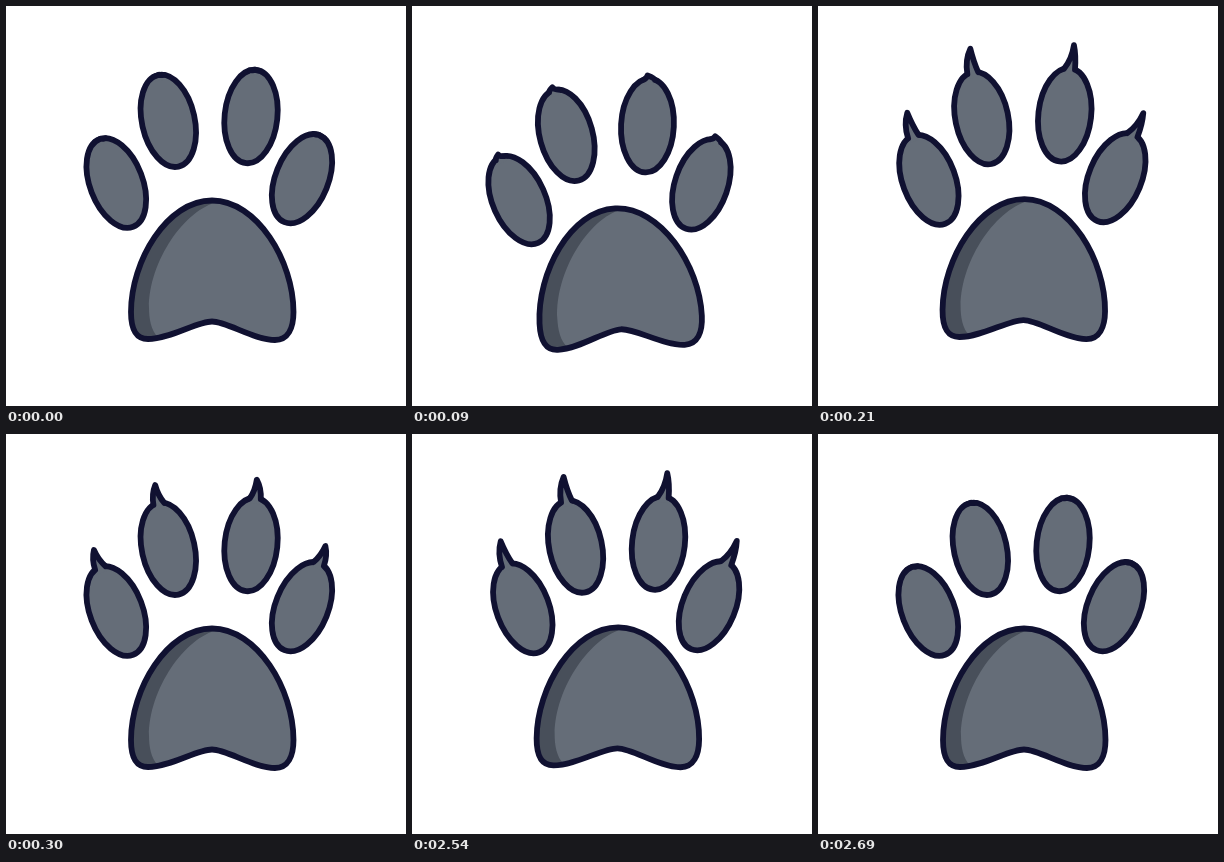
An HTML page for the animation above (3.72 s loop, 400 by 400 pixels).

```html
<!DOCTYPE html>
<html lang="en">
<head>
<meta charset="utf-8">
<title>Paw</title>
<style>
html, body { margin: 0; width: 100%; height: 100%; overflow: hidden; background: #fff; }
svg { display: block; width: 100%; height: 100%; }
.body { fill: #656d78; }
.shade { fill: #484f5a; }
.line { fill: none; stroke: #101131; stroke-width: 5.8; stroke-linecap: round; stroke-linejoin: round; }
</style>
</head>
<body>
<svg viewBox="0 0 400 400">
  <g id="pad">
    <path id="shape" class="body" d="M206 194.5C161 194.5 125 255 125 306C125 324 130 333 142 333C164 333 191 315.5 206 315.5C221 315.5 248 334 269 334C282 334 287.5 322 287.5 306C287.5 255 251 194.5 206 194.5Z"/>
    <path class="shade" d="M206 194.5C161 194.5 125 255 125 306C125 324 130 333 142 333L152 331C145 325 143 312 143 302C143 255 179 203 212 196Z"/>
    <path id="edge" class="line"/>
  </g>
</svg>
<script>
const LOOP = 3720, STEP = 30, LAST = 10, CLOSE = 2420;
const svg = document.querySelector('svg');
const pad = document.getElementById('pad');
document.getElementById('edge').setAttribute('d', document.getElementById('shape').getAttribute('d'));

function add(parent, tag, attrs = {}) {
  const el = document.createElementNS('http://www.w3.org/2000/svg', tag);
  for (const key in attrs) el.setAttribute(key, attrs[key]);
  return parent.appendChild(el);
}

// centre, tilt, offset at full dip, claw direction
const toes = [
  { x: 110.3, y: 177, tilt: -21, dx: -3.2, dy: 17, side: 1 },
  { x: 162.3, y: 114.8, tilt: -12.5, dx: -8, dy: 14.5, side: 1 },
  { x: 245, y: 110.5, tilt: 6, dx: -9.5, dy: 9, side: -1 },
  { x: 296, y: 172.7, tilt: 22, dx: -6.6, dy: 5.7, side: -1 }
];
for (const toe of toes) {
  toe.group = add(svg, 'g');
  const oval = { rx: 26.4, ry: 46.9 };
  add(toe.group, 'ellipse', { ...oval, class: 'body' });
  add(toe.group, 'ellipse', { ...oval, class: 'line' });
  toe.fill = add(toe.group, 'path', { class: 'body' });
  toe.claw = add(toe.group, 'path', { class: 'line' });
}

// Smooth interpolation through [step, value] pairs
function track(keys, k) {
  if (k <= keys[0][0]) return keys[0][1];
  for (let i = 1; i < keys.length; i++) {
    const [a, from] = keys[i - 1], [b, to] = keys[i];
    if (k <= b) {
      const u = (k - a) / (b - a);
      return from + (to - from) * u * u * (3 - 2 * u);
    }
  }
  return keys[keys.length - 1][1];
}

// The paw dips, springs past its rest pose and settles; the claws follow the rebound
const DIP = [[0, 0], [2.3, 1.18], [5.5, -0.25], [10, 0]];
const CLAW = [[2.3, 0], [5.5, 1.4], [10, 1]];

function draw(k) {
  const p = track(DIP, k), c = track(CLAW, k);
  pad.setAttribute('transform', `translate(${0.5 * p} ${7.8 * p}) rotate(${-2.7 * p} 206 265)`);
  for (const t of toes) {
    const tip = 1 - 9 * t.side * p * c;
    const d = `M-5 -46Q-4.5 ${-46 - 11 * c} ${tip} ${-47 - 18 * c}Q${tip + 0.5} ${-46 - 8 * c} 6 -45.7`;
    t.group.setAttribute('transform',
      `translate(${t.x + t.dx * p} ${t.y + t.dy * p}) rotate(${t.tilt - 3 * p}) scale(${t.side} 1)`);
    t.fill.setAttribute('d', d + 'L5 -41L-4 -41Z');
    t.claw.setAttribute('d', d);
  }
}

function frame(now) {
  const t = now % LOOP;
  const k = t < CLOSE
    ? Math.min(LAST, Math.floor(t / STEP))
    : Math.max(0, LAST - 1 - Math.floor((t - CLOSE) / STEP));
  draw(k);
  requestAnimationFrame(frame);
}
draw(0);
requestAnimationFrame(frame);
</script>
</body>
</html>
```
